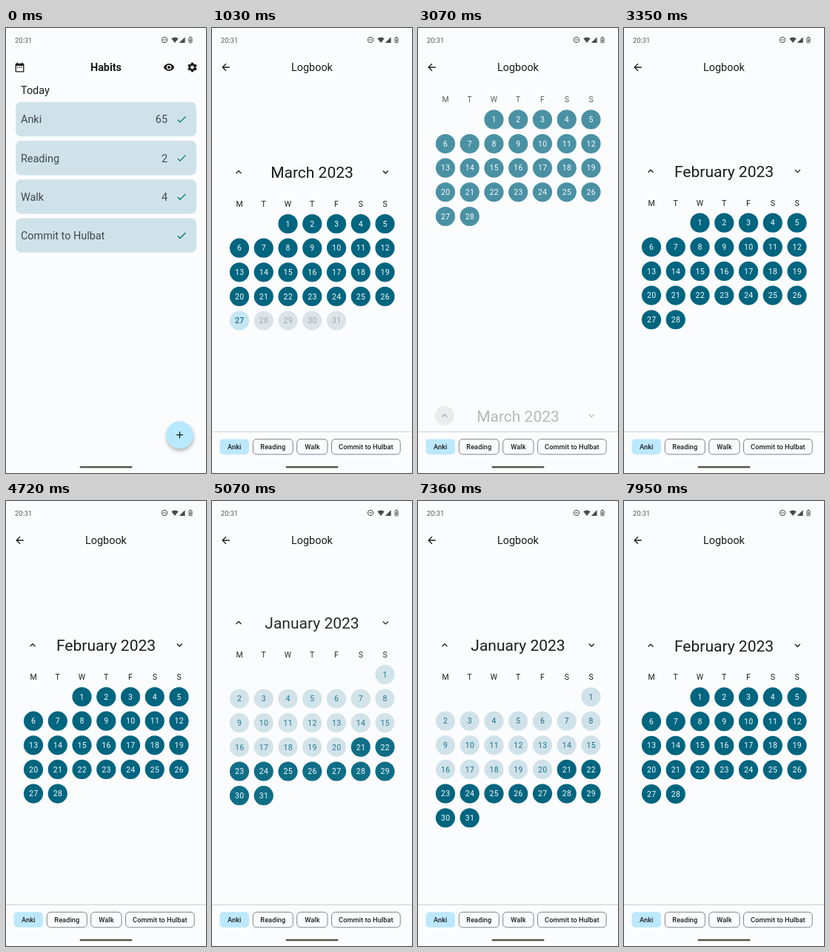
Animation of 270 by 600 pixels, one loop 8 s. Source, as an HTML page:

```html
<!DOCTYPE html>
<html lang="en">
<head>
<meta charset="utf-8">
<title>Habits</title>
<style>
  html, body { margin: 0; width: 100%; height: 100%; overflow: hidden; background: #fbfcfe; }
  svg { display: block; width: 270px; height: 600px; font-family: Roboto, "Noto Sans", sans-serif; }
</style>
</head>
<body>
<svg id="stage" viewBox="0 0 270 600"></svg>
<script>
const LOOP = 8000;
const BG = '#fbfcfe', INK = '#191c1d', PRIMARY = '#00657f', PALE = '#d0e2e9', RIPPLE = '#70706c';
const HABITS = [['Anki', 65], ['Reading', 2], ['Walk', 4], ['Commit to Hulbat', '']];
const PAGE = { top: 76, height: 469 };
const U = 270 / 411; // one dp in pixels

const ICONS = {
  back: 'M20 11H7.83l5.59-5.59L12 4l-8 8 8 8 1.41-1.41L7.83 13H20z',
  calendar: 'M9 11H7v2h2zm4 0h-2v2h2zm4 0h-2v2h2zm2-7h-1V2h-2v2H8V2H6v2H5c-1.1 0-2 .9-2 2v14c0 1.1.9 2 2 2h14c1.1 0 2-.9 2-2V6c0-1.1-.9-2-2-2zm0 16H5V9h14z',
  eye: 'M12 4.5C7 4.5 2.73 7.61 1 12c1.73 4.39 6 7.5 11 7.5s9.27-3.11 11-7.5c-1.73-4.39-6-7.5-11-7.5zM12 17a5 5 0 1 1 0-10 5 5 0 0 1 0 10zm0-8a3 3 0 1 0 0 6 3 3 0 0 0 0-6z',
  up: 'M7.41 15.41 12 10.83l4.59 4.58L18 14l-6-6-6 6z',
  down: 'M7.41 8.59 12 13.17l4.59-4.58L18 10l-6 6-6-6z',
  check: 'M9 16.17 4.83 12l-1.42 1.41L9 19 21 7l-1.41-1.41z'
};

function text(str, x, cy, size, { fill = INK, anchor = 'middle', weight = 400, gap = 0 } = {}) {
  return `<text x="${x}" y="${cy + size * 0.355}" font-size="${size}" fill="${fill}" ` +
    `text-anchor="${anchor}" font-weight="${weight}" letter-spacing="${gap}">${str}</text>`;
}

function icon(name, x, y, fill = INK) {
  return `<path d="${ICONS[name]}" fill="${fill}" transform="translate(${x} ${y}) scale(${U}) translate(-12 -12)"/>`;
}

function box(x, y, w, h, r, fill, extra = '') {
  return `<rect x="${x}" y="${y}" width="${w}" height="${h}" rx="${r}" fill="${fill}" ${extra}/>`;
}

function gear(x, y) {
  const teeth = [0, 60, 120].map(a => `<path d="M0-6.3V6.3" stroke-width="3.2" transform="rotate(${a})"/>`).join('');
  return `<g transform="translate(${x} ${y})" stroke="${INK}">${teeth}` +
    `<circle r="3.6" fill="${BG}" stroke-width="2.6"/></g>`;
}

function statusBar() {
  return text('20:31', 12, 16.3, 9.3, { fill: '#56585a', anchor: 'start' }) +
    `<g fill="#484a4b"><circle cx="214" cy="16" r="3.7" fill="none" stroke="#484a4b"/>
    <path d="M212 15.5h4v1h-4z"/>
    <path d="M223.3 14.2q4.7-3.6 9.4 0L228 20z"/>
    <path d="M241.6 12.2V20H233.8z"/></g>
    <rect x="247" y="13" width="4" height="6.8" rx=".7" fill="none" stroke="#484a4b"/>
    <path d="M248 11.8h2v1h-2zM248.3 15.2h1.5v3h-1.5z" fill="#484a4b"/>`;
}

function home() {
  const cards = HABITS.map(([name, count], i) => {
    const y = 99.8 + i * 52.2, cy = y + 23.4, fill = '#40484c';
    return box(13, y, 244, 46.4, 7.5, PALE) +
      text(name, 20, cy, 14.4, { fill, anchor: 'start' }) +
      text(count, 218, cy, 14.4, { fill, anchor: 'end' }) +
      icon('check', 237, cy, '#00796c');
  }).join('');
  return box(0, 28, 270, 560, 0, BG) +
    icon('calendar', 18.5, 53) + text('Habits', 135, 53.2, 14.4, { weight: 700 }) +
    icon('eye', 220, 53) + gear(251.5, 53) +
    text('Today', 20, 84.3, 14.4, { anchor: 'start' }) + cards +
    `<circle cx="235" cy="552" r="18.5" fill="#77776c" opacity=".5" filter="url(#soft)"/>
    <circle cx="234.5" cy="548.7" r="18.4" fill="#b7eaff"/>
    <path d="M230 548.7h9M234.5 544.2v9" stroke="${INK}" stroke-width="1.3"/>`;
}

function month({ name, first, days, kind }) {
  const looks = {
    done: [PRIMARY, '#f4fbff'], open: [PALE, '#15708a'],
    today: ['#c6e6f2', '#15708a'], off: ['#dae4e9', '#9fa8ac']
  };
  const colX = c => 37 + c * 32.75;
  let out = icon('up', 36, 194.3) + icon('down', 234.3, 194.3) + text(name, 135, 195, 21);
  [...'MTWTFSS'].forEach((d, c) => out += text(d, colX(c), 237.2, 10.5));
  for (let d = 1; d <= days; d++) {
    const cell = first + d - 1, x = colX(cell % 7), y = 264 + Math.floor(cell / 7) * 32.65;
    const type = kind(d), [fill, ink] = looks[type];
    out += `<circle cx="${x}" cy="${y}" r="13.1" fill="${fill}"/>` +
      text(d, x + 0.15, y, 10.5, { fill: ink, gap: 0.3, weight: type === 'today' ? 500 : 400 });
  }
  return out;
}

function chips() {
  const spans = [[10.5, 39.5], [55.3, 54], [114.7, 41.3], [161.5, 92.7]];
  return spans.map(([x, w], i) =>
    box(x, 554.3, w, 20.6, 5, i ? 'none' : '#bce8fd', i ? 'stroke="#70787d" stroke-width=".9"' : '') +
    text(HABITS[i][0], x + w / 2, 564.8, 9.2, { weight: 500, gap: 0.06 })).join('');
}

const MONTHS = [
  { name: 'January 2023', first: 6, days: 31, kind: d => d < 21 ? 'open' : 'done' },
  { name: 'February 2023', first: 2, days: 28, kind: () => 'done' },
  { name: 'March 2023', first: 2, days: 31, kind: d => d < 27 ? 'done' : d > 27 ? 'off' : 'today' }
];

// Each tap: time, month left, month entered
const TAPS = [[2820, 2, 1], [4720, 1, 0], [7360, 0, 1]];
const OPEN_TAP = 500, OPEN_DELAY = 60, OPEN_TIME = 460, SLIDE_DELAY = 128;

document.getElementById('stage').innerHTML = `
  <defs>
    <filter id="soft" x="-50%" y="-50%" width="200%" height="200%"><feGaussianBlur stdDeviation="2.6"/></filter>
    <clipPath id="page"><rect y="${PAGE.top}" width="270" height="${PAGE.height}"/></clipPath>
  </defs>
  ${box(0, 0, 270, 600, 0, BG)}
  <g id="home">${home()}</g>
  <g id="log">
    ${box(0, 28, 270, 560, 0, BG)}
    ${icon('back', 18.5, 53)}${text('Logbook', 135, 53.2, 14.4)}
    <g clip-path="url(#page)">
      <circle id="monthRipple" fill="${RIPPLE}"/>
      ${MONTHS.map((m, i) => `<g id="month${i}">${month(m)}</g>`).join('')}
    </g>
    <path d="M0 544.5H270" stroke="#cdd1d4"/>
    ${chips()}
  </g>
  <circle id="openRipple" cx="18.5" cy="53" fill="${RIPPLE}"/>
  ${statusBar()}
  ${box(99.5, 590.7, 71, 2.6, 1.3, '#56564a')}`;

const el = id => document.getElementById(id);
const homeEl = el('home'), logEl = el('log');
const monthEls = MONTHS.map((_, i) => el('month' + i));
const monthRipple = el('monthRipple'), openRipple = el('openRipple');
const clamp = v => Math.min(1, Math.max(0, v));

// Critically damped spring, stiffness 400
const spring = ms => ms <= 0 ? 0 : 1 - (1 + ms * 0.02) * Math.exp(-ms * 0.02);

// cubic-bezier(.4, 0, .2, 1)
function ease(x) {
  let lo = 0, hi = 1, s = 0.5;
  for (let i = 0; i < 20; i++) {
    s = (lo + hi) / 2;
    const at = 1.2 * s * (1 - s) ** 2 + 0.6 * s * s * (1 - s) + s ** 3;
    if (at < x) lo = s; else hi = s;
  }
  return 3 * s * s * (1 - s) + s ** 3;
}

function drawRipple(node, age) {
  const alpha = 0.12 * clamp(age / 75) * clamp((500 - age) / 220);
  node.setAttribute('r', 5 + 8 * Math.sqrt(clamp(age / 225)));
  node.setAttribute('opacity', age < 0 ? 0 : alpha);
}

function place(node, shift, alpha) {
  node.setAttribute('transform', `translate(0 ${shift.toFixed(2)})`);
  node.setAttribute('opacity', alpha.toFixed(4));
}

function draw(t) {
  const opened = t < OPEN_TAP + OPEN_DELAY ? 0 : ease(clamp((t - OPEN_TAP - OPEN_DELAY) / OPEN_TIME));
  homeEl.setAttribute('opacity', opened < 1 ? 1 : 0);
  logEl.setAttribute('opacity', opened);
  drawRipple(openRipple, t - OPEN_TAP);

  monthEls.forEach(m => place(m, 0, 0));
  const tap = TAPS.filter(([at]) => t >= at).pop();
  if (!tap) {
    place(monthEls[2], 0, 1);
    drawRipple(monthRipple, -1);
    return;
  }
  const [at, from, to] = tap;
  const p = spring(t - at - SLIDE_DELAY), dir = to < from ? 1 : -1;
  place(monthEls[from], dir * p * PAGE.height, 1 - p);
  place(monthEls[to], dir * (p - 1) * PAGE.height, p);
  monthRipple.setAttribute('cx', dir > 0 ? 36 : 234.3);
  monthRipple.setAttribute('cy', 194.3 + dir * p * PAGE.height);
  drawRipple(monthRipple, t - at);
}

let start;
function tick(now) {
  start ??= now;
  draw((now - start) % LOOP);
  requestAnimationFrame(tick);
}
draw(0);
requestAnimationFrame(tick);
</script>
</body>
</html>
```
